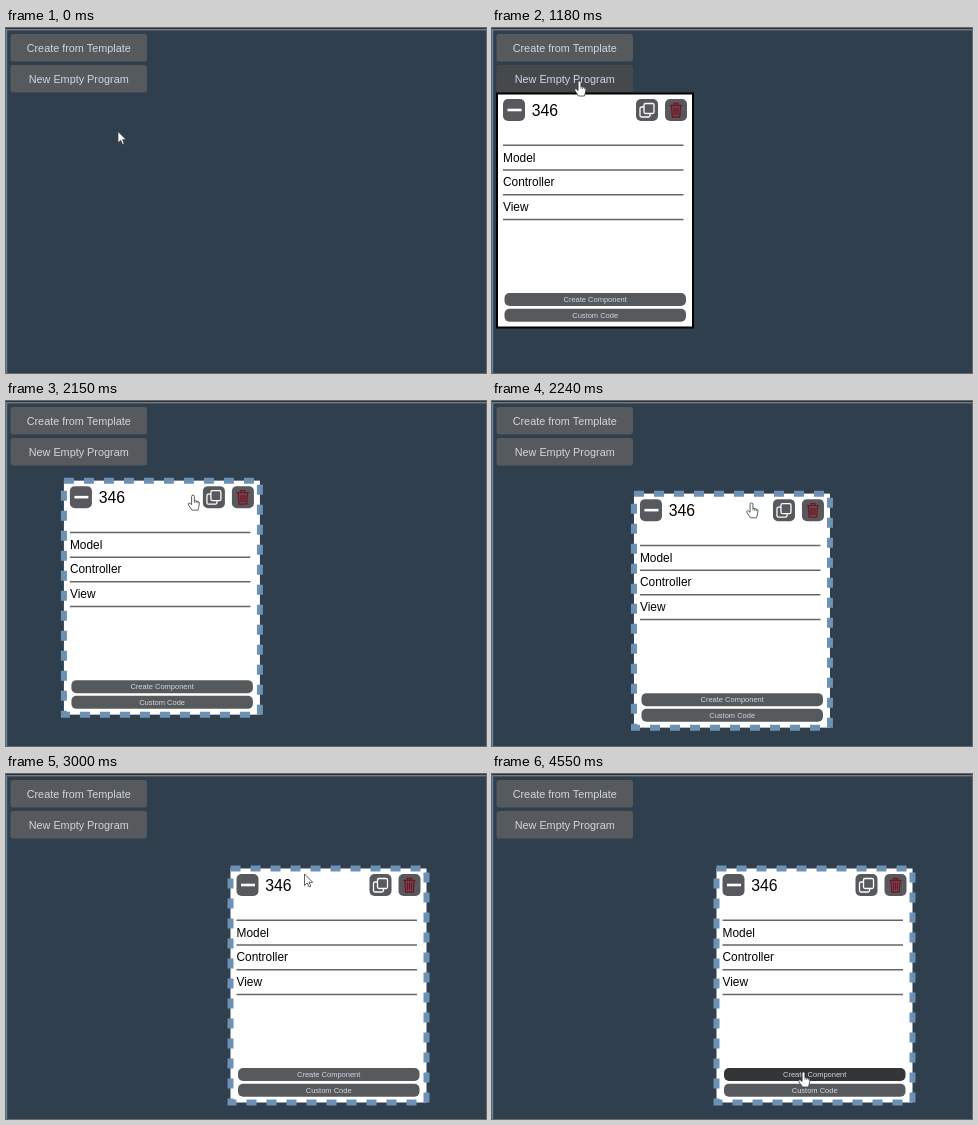
Animation of 480 by 345 pixels, one loop 4.61 s. Source, as an HTML page:

```html
<!DOCTYPE html>
<html lang="en">
<head>
<meta charset="utf-8">
<style>
  html, body { margin: 0; width: 100%; height: 100%; overflow: hidden; background: #2f3f4e; }
  svg { display: block; width: 480px; height: 345px; font-family: "Liberation Sans", Arial, sans-serif; }
  .button rect { fill: #575a5c; }
  .button text { fill: #d0d5e3; text-anchor: middle; }
  .button.hover rect { fill: #46494b; }
  .button.pressed rect { fill: #333537; }
  .icon rect { fill: #57595c; }
  .icon path { fill: none; stroke-width: 1.3; stroke-linejoin: round; stroke-linecap: round; }
  #frame { fill: #fff; stroke: #000; stroke-width: 2; }
  #frame.selected { stroke: #6c91b3; stroke-width: 6; stroke-dasharray: 10; }
</style>
</head>
<body>
<svg viewBox="0 0 480 345">
  <rect width="480" height="345" fill="#2f3f4e"/>
  <rect width="480" height="1" fill="#2b333c"/>
  <rect y="1" width="480" height="1.4" fill="#737a80"/>
  <rect y="2" width="1.2" height="343" fill="#62879f"/>

  <g class="button" font-size="10.85">
    <rect x="4.5" y="6" width="136.5" height="27.5" rx="3"/>
    <text x="72.7" y="23.7">Create from Template</text>
  </g>
  <g class="button" id="newProgram" font-size="10.85">
    <rect x="4.5" y="37" width="136.5" height="27.5" rx="3"/>
    <text x="72.7" y="54.5">New Empty Program</text>
  </g>

  <g id="card">
    <rect id="frame" x="5" y="65.5" width="196" height="234"/>
    <g class="icon">
      <rect x="11" y="71" width="22" height="22" rx="5"/>
      <path d="M15.5 82H29.5" stroke="#fff" style="stroke-width:2.6;stroke-linecap:butt"/>
    </g>
    <text x="39.8" y="87.5" font-size="15.8">346</text>
    <g class="icon">
      <rect x="144" y="71" width="22" height="22" rx="5"/>
      <path stroke="#fff" d="M153.500 75.500h7q1.500 0 1.500 1.500v7q0 1.500-1.500 1.500h-7q-1.500 0-1.500-1.500v-7q0-1.500 1.500-1.500zM152 79h-2.500q-1.500 0-1.500 1.500v7q0 1.500 1.500 1.500h7q1.500 0 1.500-1.500v-2"/>
    </g>
    <g class="icon">
      <rect x="173" y="71" width="22" height="22" rx="5"/>
      <path stroke="#7d1022" d="M178.500 77.500h11M182 77.500v-2h4v2M179.500 78l.7 11h7.600l.7-11M182 80v6.500M184 80v6.500M186 80v6.500"/>
    </g>
    <path d="M11 117.300H191.500M11 142H191.500M11 166.700H191.500M11 191.400H191.500" stroke="#666" stroke-width="1.500"/>
    <g font-size="11.9">
      <text x="11" y="133.500">Model</text>
      <text x="11" y="158.300">Controller</text>
      <text x="11" y="183">View</text>
    </g>
    <g class="button" id="createComponent" font-size="7.5">
      <rect x="12.500" y="265" width="181.500" height="13" rx="5"/>
      <text x="103.200" y="274">Create Component</text>
    </g>
    <g class="button" font-size="7.5">
      <rect x="12.500" y="280.700" width="181.500" height="13" rx="5"/>
      <text x="103.200" y="289.700">Custom Code</text>
    </g>
  </g>

  <g id="cursor" fill="#fff" stroke="#33383d" stroke-width=".8" stroke-linejoin="round">
    <path id="arrow" d="M0 0V11.500L2.700 9 4.500 13 6.300 12.200 4.600 8.300H8.200Z"/>
    <g id="hand">
      <path d="M-1.400 1.400a1.400 1.400 0 0 1 2.800 0V5.500L5 6.300q1.600.4 1.500 2L5.700 12.200 5 15H-1L-4.400 10q-1-1.600.2-2.100 1-.3 2.800 1.600z"/>
      <path d="M1.400 5.500v2.300M3.200 6v2M5 6.400v2" fill="none" stroke-width=".6"/>
    </g>
  </g>
</svg>
<script>
const LOOP = 4610;
const LAG = 60;
const GRAB = [79, 71];
const $ = id => document.getElementById(id);

// Pointer path: time, x, y
const path = [
  [0, 112, 103.5], [150, 108, 94], [330, 94, 68], [520, 87.5, 53],
  [1520, 87.5, 53], [1730, 81.5, 73], [1880, 79, 71], [2000, 79, 71],
  [2030, 83, 72], [2090, 131, 85], [2150, 186, 94], [2210, 244, 102],
  [2300, 289, 101.5], [2360, 297, 101], [2500, 298.5, 100], [3120, 298.5, 100],
  [3300, 301, 150], [3500, 306, 235], [3670, 309, 284], [3850, 311, 297],
  [4200, 311.5, 298], [LOOP, 311.5, 298]
];

function pointerAt(t) {
  const i = Math.max(1, path.findIndex(key => key[0] >= t));
  const [t0, x0, y0] = path[i - 1], [t1, x1, y1] = path[i];
  const k = (t - t0) / (t1 - t0);
  return [x0 + (x1 - x0) * k, y0 + (y1 - y0) * k];
}

function show(id, visible) {
  $(id).style.display = visible ? "" : "none";
}

function setButton(id, hover, pressed) {
  $(id).setAttribute("class", "button" + (pressed ? " pressed" : hover ? " hover" : ""));
}

function move(id, x, y) {
  $(id).setAttribute("transform", `translate(${x} ${y})`);
}

function render(t) {
  const [x, y] = pointerAt(t);
  const overNew = t < 2000 && y < 64.5;
  const overCreate = t > 3600 && y > 293;
  const dragging = t >= 1970 && t < 2610;

  move("cursor", x, y);
  show("hand", overNew || overCreate || dragging);
  show("arrow", !(overNew || overCreate || dragging));
  setButton("newProgram", overNew, t >= 760 && t < 940);
  setButton("createComponent", overCreate, t >= 4550);

  show("card", t >= 940);
  $("frame").setAttribute("class", t >= 1970 ? "selected" : "");
  const [cx, cy] = pointerAt(Math.min(Math.max(t - LAG, 2000), 2500));
  move("card", cx - GRAB[0], cy - GRAB[1]);
}

const start = performance.now();
function tick() {
  render((performance.now() - start) % LOOP);
  requestAnimationFrame(tick);
}
tick();
</script>
</body>
</html>
```
